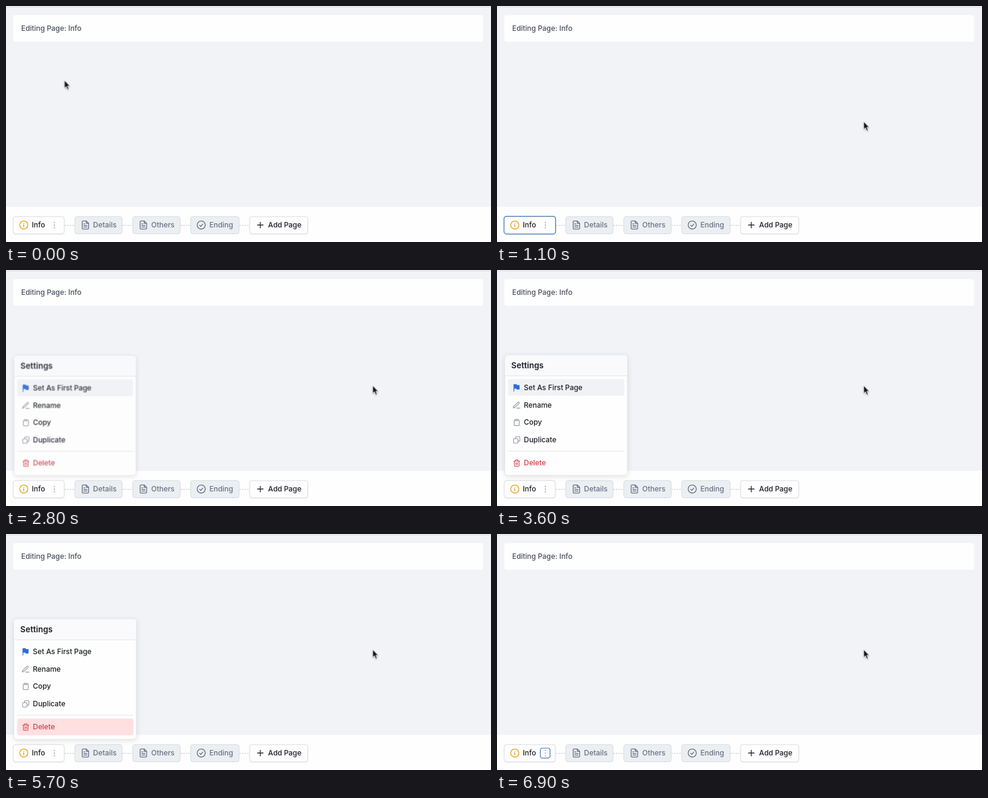
An HTML page for the animation above (8 s loop, 800 px wide and 389 px high).

```html
<!DOCTYPE html>
<html lang="en">
<head>
<meta charset="utf-8">
<title>Page settings menu</title>
<style>
  html, body { margin: 0; width: 100%; height: 100%; overflow: hidden; background: #f1f3f6; }
  svg { display: block; width: 100%; height: 100%; }
  text { font: 500 11.9px Inter, sans-serif; fill: #1b1e25; }
  .icon { fill: none; stroke: currentColor; stroke-width: 2; stroke-linecap: round; stroke-linejoin: round; }
  .tab { fill: #eceff2; stroke: #d6dae1; }
  .open { fill: #fefefe; stroke: #d9dce3; filter: drop-shadow(0 1px 1px #0000000f); }
  .muted { color: #667085; }
  .muted text { fill: #667085; }
  .ring { fill: none; stroke: #4677b4; stroke-width: 1.2; }
  .link { stroke: #c3c8d1; stroke-dasharray: 2.5 1.7; }
  .hover { fill: #f1f2f5; }

  /* One 8 s timeline: 1% = 80 ms */
  .cursor, .ring, .menu, .hover { animation: 8s linear infinite; }
  .cursor { animation-name: glide; }
  .tab-ring { animation-name: tab-ring; animation-timing-function: step-end; }
  .dots-ring { animation-name: dots-ring; animation-timing-function: step-end; }
  .menu { animation-name: menu; transform-origin: 80px 338px; }
  .first { animation-name: first; }
  .rename { animation-name: rename; }
  .copy { animation-name: copy; }
  .duplicate { animation-name: duplicate; }
  .delete { animation-name: delete; fill: #fee0e0; }

  @keyframes glide {
    0%, 1.9% { transform: translate(96.4px, 122.6px); animation-timing-function: ease-in-out; }
    10%, 100% { transform: translate(604.9px, 190.6px); }
  }
  @keyframes tab-ring {
    0% { opacity: 0; }
    13.75% { opacity: 1; }
    28.75%, 100% { opacity: 0; }
  }
  @keyframes dots-ring {
    0% { opacity: 0; }
    28.75% { opacity: 1; }
    33.75% { opacity: 0; }
    85%, 100% { opacity: 1; }
  }
  @keyframes menu {
    0%, 33.1% { opacity: 0; transform: scale(.95); animation-timing-function: ease-out; }
    35.6%, 83.1% { opacity: 1; transform: none; animation-timing-function: ease-in; }
    85.9%, 100% { opacity: 0; transform: scale(.95); }
  }
  @keyframes first {
    0%, 50.6% { opacity: 1; }
    53%, 100% { opacity: 0; }
  }
  @keyframes rename {
    0%, 50.6% { opacity: 0; }
    53%, 55.4% { opacity: 1; }
    57.5%, 100% { opacity: 0; }
  }
  @keyframes copy {
    0%, 55.4% { opacity: 0; }
    57.5%, 58.75% { opacity: 1; }
    61.1%, 100% { opacity: 0; }
  }
  @keyframes duplicate {
    0%, 58.75% { opacity: 0; }
    61.1%, 62.4% { opacity: 1; }
    65%, 100% { opacity: 0; }
  }
  @keyframes delete {
    0%, 62.4% { opacity: 0; }
    66%, 100% { opacity: 1; }
  }
</style>
</head>
<body>
<svg viewBox="0 0 800 389" preserveAspectRatio="none">
  <defs>
    <symbol id="file" viewBox="0 0 24 24">
      <path d="M14 2H6a2 2 0 0 0-2 2v16a2 2 0 0 0 2 2h12a2 2 0 0 0 2-2V8zM14 2v6h6M16 13H8M16 17H8M10 9H8"/>
    </symbol>
  </defs>

  <rect width="800" height="389" fill="#f1f3f6"/>
  <rect width="800" height="1" fill="#f8f9fb"/>
  <rect y="1" width="800" height="1" fill="#d8dae0"/>
  <rect x="12" y="15" width="775" height="44" rx="4" fill="#fefefe"/>
  <text x="25" y="41.3" style="fill:#49505c">Editing Page: Info</text>

  <rect y="331" width="800" height="58" fill="#fefefe"/>
  <path class="link" d="M97 361.5H113M192 361.5H209M288 361.5H304M385 361.5H402"/>

  <g>
    <rect class="open" x="12" y="347" width="84" height="28.5" rx="4"/>
    <g class="icon" color="#e2a31c" transform="translate(21.3 353) scale(.67)">
      <circle cx="12" cy="12" r="10"/>
      <path d="M12 16.5V11.5H11M12 7.6h.01"/>
    </g>
    <text x="42.6" y="365.3">Info</text>
    <g fill="#7b8290">
      <circle cx="79.7" cy="356.8" r=".85"/>
      <circle cx="79.7" cy="361.2" r=".85"/>
      <circle cx="79.7" cy="365.6" r=".85"/>
    </g>
    <rect class="ring tab-ring" x="11.5" y="346.6" width="85.2" height="29.2" rx="4"/>
    <rect class="ring dots-ring" x="71.5" y="353" width="16" height="16.3" rx="3.2"/>
  </g>

  <g class="muted">
    <rect class="tab" x="113.5" y="347" width="78" height="28.5" rx="4"/>
    <use class="icon" href="#file" x="123" y="353" width="16" height="16"/>
    <text x="143.6" y="365.3">Details</text>

    <rect class="tab" x="209" y="347" width="78.3" height="28.5" rx="4"/>
    <use class="icon" href="#file" x="218.6" y="353" width="16" height="16"/>
    <text x="239.6" y="365.3">Others</text>

    <rect class="tab" x="304.7" y="347" width="79.8" height="28.5" rx="4"/>
    <g class="icon" transform="translate(314 353) scale(.67)">
      <circle cx="12" cy="12" r="10"/>
      <path d="m8 12.5 2.7 2.7L16 9.5"/>
    </g>
    <text x="335.4" y="365.3">Ending</text>
  </g>

  <rect class="open" x="402" y="347" width="95.7" height="28.5" rx="4"/>
  <path class="icon" color="#252932" transform="translate(411.4 353) scale(.67)" d="M12 5v14M5 12h14"/>
  <text x="432.3" y="365.3">Add Page</text>

  <g class="menu">
    <rect x="13" y="140" width="202" height="198.5" rx="5" fill="#fefefe" stroke="#e1e4e9" stroke-width=".8"
      style="filter:drop-shadow(0 2px 4px #1018281f)"/>
    <path d="M13.4 174.5V145a4.6 4.6 0 0 1 4.6-4.6h192a4.6 4.6 0 0 1 4.6 4.6v29.5z" fill="#fafafc"/>
    <path d="M13.4 174.5H214.6M18.5 298.5H210" stroke="#e2e5ea"/>
    <text x="23.5" y="162.2" style="font-size:13.4px;font-weight:600">Settings</text>

    <rect class="hover first" x="18.5" y="179.8" width="191.7" height="27.4" rx="3"/>
    <rect class="hover rename" x="18.5" y="208.6" width="191.7" height="27.4" rx="3"/>
    <rect class="hover copy" x="18.5" y="237.4" width="191.7" height="27.4" rx="3"/>
    <rect class="hover duplicate" x="18.5" y="266.2" width="191.7" height="27.4" rx="3"/>
    <rect class="hover delete" x="18.5" y="304.3" width="191.7" height="27.4" rx="3"/>

    <path d="M27.3 188.3h5l.6 1.4h4.3v7.3h-4.8l-.6-1.4h-3.3v4.6h-1.2z" fill="#2d6bd9"/>
    <g class="icon" color="#8b919d">
      <g transform="translate(26 216.2) scale(.52)">
        <path d="M13 22h10M16.5 3.5a2.1 2.1 0 0 1 3.6 3.4L6.5 20 1.5 21.5 3 16.5z"/>
      </g>
      <g transform="translate(26.3 245) scale(.52)">
        <path d="M16 4h2a2 2 0 0 1 2 2v14a2 2 0 0 1-2 2H6a2 2 0 0 1-2-2V6a2 2 0 0 1 2-2h2"/>
        <rect x="8" y="2" width="8" height="4" rx="1"/>
      </g>
      <g transform="translate(26.3 273.8) scale(.52)">
        <rect x="2" y="8" width="14" height="14" rx="2"/>
        <path d="M8 8V4a2 2 0 0 1 2-2h10a2 2 0 0 1 2 2v10a2 2 0 0 1-2 2h-4"/>
      </g>
    </g>
    <g class="icon" color="#cf4047" transform="translate(26.1 311.7) scale(.54)">
      <path d="M2.5 6h19M19 6v14a2 2 0 0 1-2 2H7a2 2 0 0 1-2-2V6M8 6V4a2 2 0 0 1 2-2h4a2 2 0 0 1 2 2v2M10 11v6M14 11v6"/>
    </g>

    <text x="44.3" y="197.8">Set As First Page</text>
    <text x="44.3" y="226.6">Rename</text>
    <text x="44.3" y="255.4">Copy</text>
    <text x="44.3" y="284.2">Duplicate</text>
    <text x="44.3" y="322.3" style="fill:#cf4047">Delete</text>
  </g>

  <path class="cursor" d="M0 0V12.6L2.9 10 5 14.9 7.1 14 5.1 9.2H8.8z" fill="#16171b" stroke="#fff" stroke-width=".8"
    style="filter:drop-shadow(.5px 1px .8px #0005)"/>
</svg>
</body>
</html>
```
